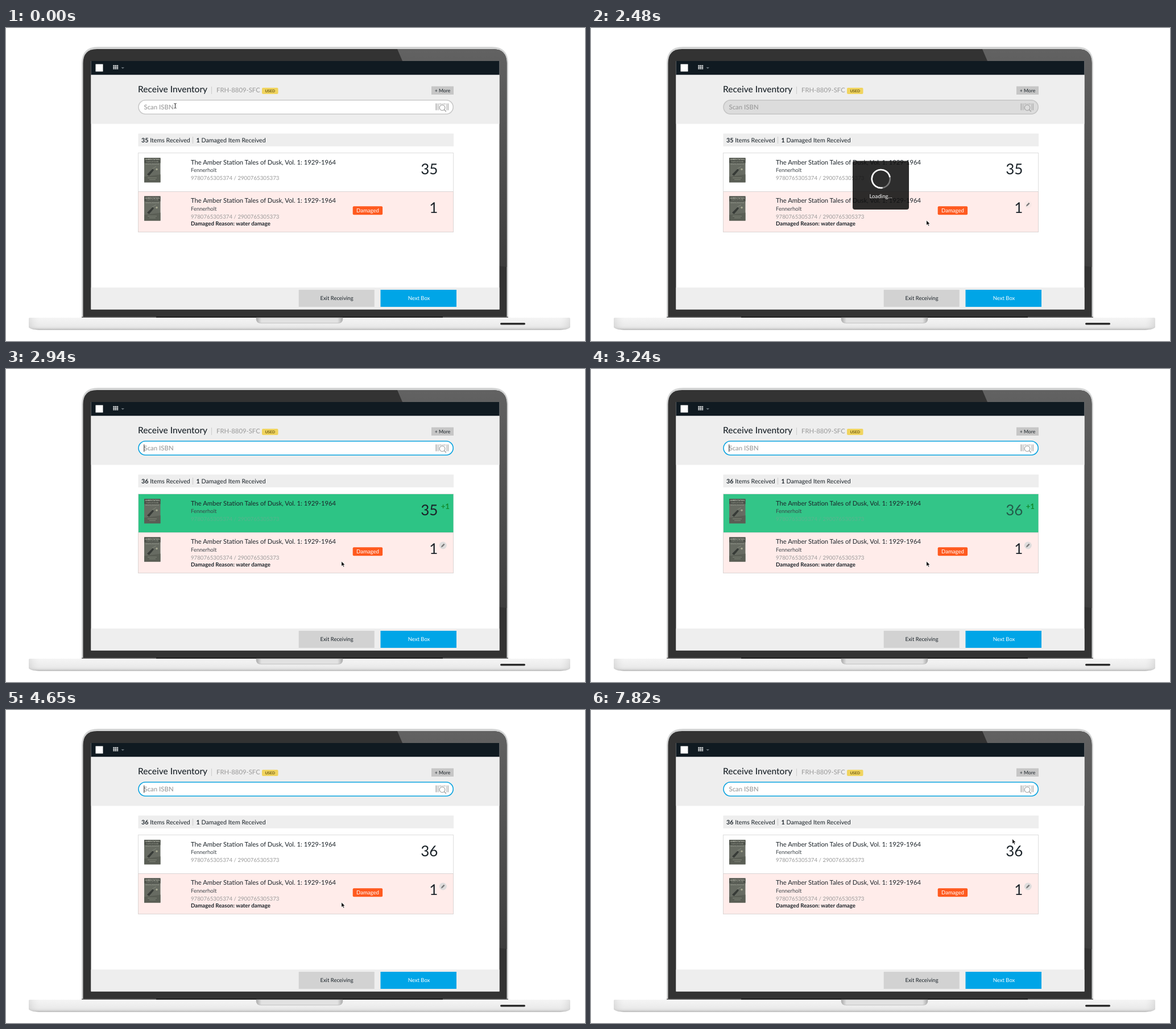
Animation of 1018 by 550 pixels, one loop 7990 ms. Source, as an HTML page:

```html
<!DOCTYPE html>
<html lang="en">
<head>
<meta charset="utf-8">
<title>Receive Inventory</title>
<style>
html, body { margin: 0; width: 100%; height: 100%; overflow: hidden; background: #fff; }
svg { display: block; width: 1018px; height: 550px; }
text { font-family: Lato, "Open Sans", sans-serif; fill: #1b2329; text-rendering: geometricPrecision; white-space: pre; }
.medium { font-weight: 500; }
.bold { font-weight: 700; }
.mute { fill: #999; }
.mid { text-anchor: middle; }
.end { text-anchor: end; }
</style>
</head>
<body>
<svg id="stage" viewBox="0 0 1018 550" xmlns="http://www.w3.org/2000/svg">
  <defs>
    <linearGradient id="baseFill" x1="0" y1="0" x2="0" y2="1">
      <stop offset="0" stop-color="#f4f4f4"/>
      <stop offset=".7" stop-color="#e8e8e8"/>
      <stop offset=".88" stop-color="#d8d8d8"/>
      <stop offset="1" stop-color="#a2a2a2"/>
    </linearGradient>
    <linearGradient id="baseEnds">
      <stop offset="0" stop-color="#aaa" stop-opacity=".25"/>
      <stop offset=".02" stop-color="#fff" stop-opacity=".1"/>
      <stop offset=".98" stop-color="#fff" stop-opacity=".1"/>
      <stop offset="1" stop-color="#aaa" stop-opacity=".25"/>
    </linearGradient>
    <linearGradient id="notchFill">
      <stop offset="0" stop-color="#aaa"/>
      <stop offset=".06" stop-color="#e2e2e2"/>
      <stop offset=".94" stop-color="#e2e2e2"/>
      <stop offset="1" stop-color="#aaa"/>
    </linearGradient>
    <linearGradient id="glare" x1="0" y1="0" x2="0" y2="1">
      <stop offset="0" stop-color="#626262"/>
      <stop offset="1" stop-color="#3d3d3d"/>
    </linearGradient>
    <path id="base" d="M40 510.5 Q40 509 42 509 H990 Q992 509 992 510.5 V526 Q988 530.5 970 530.5 H62 Q44 530.5 40 526Z"/>
    <g id="cover">
      <rect width="28.5" height="43" fill="#676b62"/>
      <rect width="28.5" height="9" fill="#4c5049"/>
      <path d="M0 33 L28.5 29 V43 H0Z" fill="#5a5e55"/>
      <path d="M5 29 L15 19 L17 21.5 L8.5 31.5Z" fill="#373b37"/>
      <path d="M14 19 L21 15 M6 35 H22 M9 38 H20" stroke="#82877b" stroke-width="1"/>
      <circle cx="22" cy="20" r="1.8" fill="#a3a58f"/>
      <text class="mid bold" x="14.2" y="4" font-size="3.2" style="fill:#d5d6c8">AMBER STATION</text>
      <text class="mid" x="14.2" y="7.8" font-size="3" style="fill:#b9bbae">TALES OF DUSK</text>
      <text class="mid" x="14.2" y="12" font-size="2.6" style="fill:#b3b6aa">Edited by Fennerholt</text>
    </g>
  </defs>

  <!-- laptop -->
  <path d="M133 510 V62 Q133 33 162 33 H854 Q883 33 883 62 V510Z" fill="#d3d4d4"/>
  <path d="M135.5 508.5 V62 Q135.5 37 160 37 H856 Q880.5 37 880.5 62 V508.5Z" fill="#333"/>
  <path d="M688 37 H856 Q880.5 37 880.5 62 V420 L867 418 V58 H697Z" fill="url(#glare)"/>
  <rect x="133" y="507.5" width="750" height="1.5" fill="#666"/>
  <rect x="264" y="507" width="504" height="2" fill="#222"/>
  <use href="#base" fill="url(#baseFill)"/>
  <use href="#base" fill="url(#baseEnds)"/>
  <path d="M440 509 H592 V511 Q592 518.5 584 518.5 H448 Q440 518.5 440 511Z" fill="url(#notchFill)" stroke="#b4b4b4" stroke-width=".7"/>
  <rect x="869" y="518" width="44" height="3.4" rx="1.7" fill="#2c2c2c"/>

  <!-- page -->
  <rect x="149.5" y="58" width="718" height="436.5" fill="#fff"/>
  <rect x="149.5" y="58" width="718" height="24.5" fill="#101a21"/>
  <rect x="149.5" y="82.5" width="718" height="86" fill="#eee"/>
  <rect x="149.5" y="456" width="718" height="38.5" fill="#eee"/>
  <rect x="157.5" y="63.5" width="13" height="13" fill="#fff"/>
  <g id="menu" fill="#e9ebec"></g>
  <path d="M202.5 69 H208 L205.2 71.8Z" fill="#69737a"/>

  <text class="medium" x="232" y="113" font-size="15.5">Receive Inventory</text>
  <path d="M361.5 103 V116" stroke="#ccc"/>
  <text class="mute" x="370" y="113.3" font-size="11.3">FRH-8809-SFC</text>
  <rect x="450" y="105" width="28.5" height="11" rx="2" fill="#f0d45f"/>
  <text class="mid bold" x="464.2" y="112.9" font-size="6.7" style="fill:#6c5a16">USED</text>
  <rect x="748" y="102.5" width="39" height="14.5" fill="#c6c6c6"/>
  <text class="mid" x="767.5" y="113" font-size="8.6">+ More</text>

  <rect id="field" x="233" y="126.8" width="553.2" height="24.4" rx="12.2"/>
  <text id="entry" x="242.5" y="143"></text>
  <path id="caret" stroke="#222" stroke-width="1"/>
  <g id="scan" fill="#b0b0b0" stroke="#aaa"></g>

  <rect x="232.5" y="185.5" width="554.5" height="22.5" fill="#eee"/>
  <text x="238" y="200.6" font-size="10.7"><tspan id="total" class="bold">35</tspan> Items Received</text>
  <path d="M328.5 191 V203" stroke="#ccc"/>
  <text x="334.5" y="200.6" font-size="10.7"><tspan class="bold">1</tspan> Damaged Item Received</text>

  <rect x="232.5" y="219.5" width="554" height="68" fill="#fff" stroke="#ddd"/>
  <rect id="flash" x="233" y="220" width="553.5" height="67" fill="#2dc485"/>
  <rect x="232.5" y="287.5" width="554" height="71" fill="#ffecea" stroke="#dcd5d4"/>
  <g id="rows"></g>
  <text class="bold" x="325" y="347" font-size="9.7">Damaged Reason: water damage</text>
  <rect x="609.7" y="313.3" width="52.4" height="15" rx="2" fill="#ff5a1f"/>
  <text class="mid" x="636" y="324" font-size="9.6" style="fill:#fff">Damaged</text>
  <text id="count" class="end" x="759.3" y="257" font-size="26">35</text>
  <text class="end" x="759.3" y="324.5" font-size="26">1</text>
  <text id="plus" class="bold" x="764.7" y="245.5" font-size="13.2" style="fill:#128a2c">+1</text>
  <g id="pencil">
    <circle id="disc" cx="768.3" cy="310" r="6.5" fill="#dedcdc"/>
    <path d="M765 313.4 L765.8 310.8 L769.8 306.8 L771.5 308.5 L767.5 312.5Z" fill="#777"/>
  </g>

  <rect x="514.7" y="460" width="133" height="30" fill="#d2d2d2"/>
  <text class="mid" x="581.5" y="478.4" font-size="9.5">Exit Receiving</text>
  <rect x="658.5" y="460" width="133.5" height="30" fill="#00a5e7"/>
  <text class="mid" x="726" y="478.4" font-size="9.5" style="fill:#fff">Next Box</text>

  <g id="loader">
    <rect x="460" y="233.5" width="99" height="85.5" rx="4" fill="#111" fill-opacity=".88"/>
    <circle cx="509.8" cy="265" r="16" fill="none" stroke="#777" stroke-width="2.6"/>
    <path d="M512.6 280.7 A16 16 0 1 1 525.5 262.2" fill="none" stroke="#fff" stroke-width="2.6"/>
    <text class="mid" x="509.5" y="298.6" font-size="9.7" style="fill:#fff">Loading...</text>
  </g>

  <path id="beam" d="M295.5 132.5 Q297.5 132.5 297.5 134 V139.5 Q297.5 141 295.5 141 M299.5 132.5 Q297.5 132.5 297.5 134 M297.5 139.5 Q297.5 141 299.5 141" fill="none" stroke="#222" stroke-width="1"/>
  <path id="arrow" d="M0 0 V8.6 L2 6.8 L3.4 10 L4.9 9.3 L3.5 6.2 H6.2Z" fill="#000" stroke="#fff" stroke-width=".7"/>
</svg>
<script>
const LOOP = 7990;
const CODE = "978076530537499990";
const $ = id => document.getElementById(id);
const show = (id, on) => $(id).setAttribute("visibility", on ? "visible" : "hidden");
const set = (id, attrs) => { for (const k in attrs) $(id).setAttribute(k, attrs[k]); };
const within = (t, a, b) => t >= a && t < b;

// Value of the last [time, value] step already reached
const step = (t, steps) => steps.reduce((v, s) => t >= s[0] ? s[1] : v, steps[0][1]);

function build() {
  let dots = "";
  for (let i = 0; i < 9; i++)
    dots += `<rect x="${188.3 + i % 3 * 3.2}" y="${65.3 + Math.floor(i / 3) * 2.6}" width="2.5" height="1.9"/>`;
  $("menu").innerHTML = dots;

  let bars = "";
  for (let i = 0; i < 10; i++) {
    const side = i < 3 || i > 7;
    bars += `<rect x="${755.4 + i * 2.35}" y="132.5" width="${i % 3 ? 1 : 1.5}" height="${side ? 12 : 2}" stroke="none"/>`;
  }
  $("scan").innerHTML = bars +
    '<circle cx="767" cy="140" r="4.8" fill="none" stroke-width="1.3"/><path d="M770.5 143.5 L773.8 146.8" stroke-width="1.7"/>';

  $("rows").innerHTML = [0, 67.3].map((dy, i) => `<g transform="translate(0 ${dy})">
    <use href="#cover" x="243" y="228.3"/>
    <text x="325" y="239.6" font-size="11.25">The Amber Station Tales of Dusk, Vol. 1: 1929-1964</text>
    <text x="325" y="253.3" font-size="9.5" style="fill:#3c4348">Fennerholt</text>
    <text id="isbn${i}" class="mute" x="325" y="267.3" font-size="9.7">9780765305374 / 2900765305373</text></g>`).join("");
}

const FIELD = {
  idle: ["#fff", "#c9c9c9"],
  half: ["#fff", "#79bad3"],
  focus: ["#fff", "#0ba3df"],
  off: ["#dcdcdc", "#c5c5c5"]
};
const FIELD_STEPS = [[0, "idle"], [300, "half"], [470, "focus"], [2480, "off"], [2810, "focus"]];
const CARET_STEPS = [[0, 0], [470, 1], [940, 0], [1540, 1], [2480, 0], [2810, 1], [4050, 0],
  [4650, 1], [5080, 0], [5680, 1], [6620, 0], [7090, 1], [7690, 0]];
const FLASH_STEPS = [[0, 0], [2810, .61], [2940, 1], [3240, .97], [3410, 0]];
const COUNT_FADE = [[0, 1], [3110, .45], [3240, .65], [3410, 1]];
const ARROW_STEPS = [[0, null], [2480, [589.8, 338]], [5550, [586, 420]], [5680, [582.5, 480]],
  [5850, null], [6150, [700, 354]], [7690, [722, 290]], [7820, [740.8, 226.5]]];

function draw(t) {
  const [fill, stroke] = FIELD[step(t, FIELD_STEPS)];
  set("field", { fill, stroke, "stroke-width": 1.6 });

  const typed = within(t, 1540, 2480);
  $("entry").textContent = typed ? CODE : "Scan ISBN";
  $("entry").style.fill = typed ? "#1b2329" : "#999";
  set("entry", { "font-size": typed ? 10.9 : 11.4, "font-weight": typed ? 400 : 500 });
  const x = typed ? 357.3 : 242.8;
  set("caret", { d: `M${x} 132.5 V145.5` });
  show("caret", step(t, CARET_STEPS));

  const glow = step(t, FLASH_STEPS);
  set("flash", { opacity: glow });
  set("isbn0", { opacity: glow > .9 ? .4 : 1 });
  $("total").textContent = t < 2810 ? 35 : 36;
  $("count").textContent = t < 3240 ? 35 : 36;
  set("count", { opacity: step(t, COUNT_FADE) });
  show("plus", within(t, 2810, 3580));
  set("plus", { opacity: t < 3410 ? 1 : .5 });

  show("loader", within(t, 2480, 2610));
  show("pencil", within(t, 2480, 5550) || t >= 6150);
  set("disc", { opacity: t < 2610 ? .25 : 1 });

  show("beam", t < 2480);
  const tip = step(t, ARROW_STEPS);
  show("arrow", tip);
  if (tip) set("arrow", { transform: `translate(${tip})` });
}

build();
const start = performance.now();
function tick() {
  draw((performance.now() - start) % LOOP);
  requestAnimationFrame(tick);
}
tick();
</script>
</body>
</html>
```
